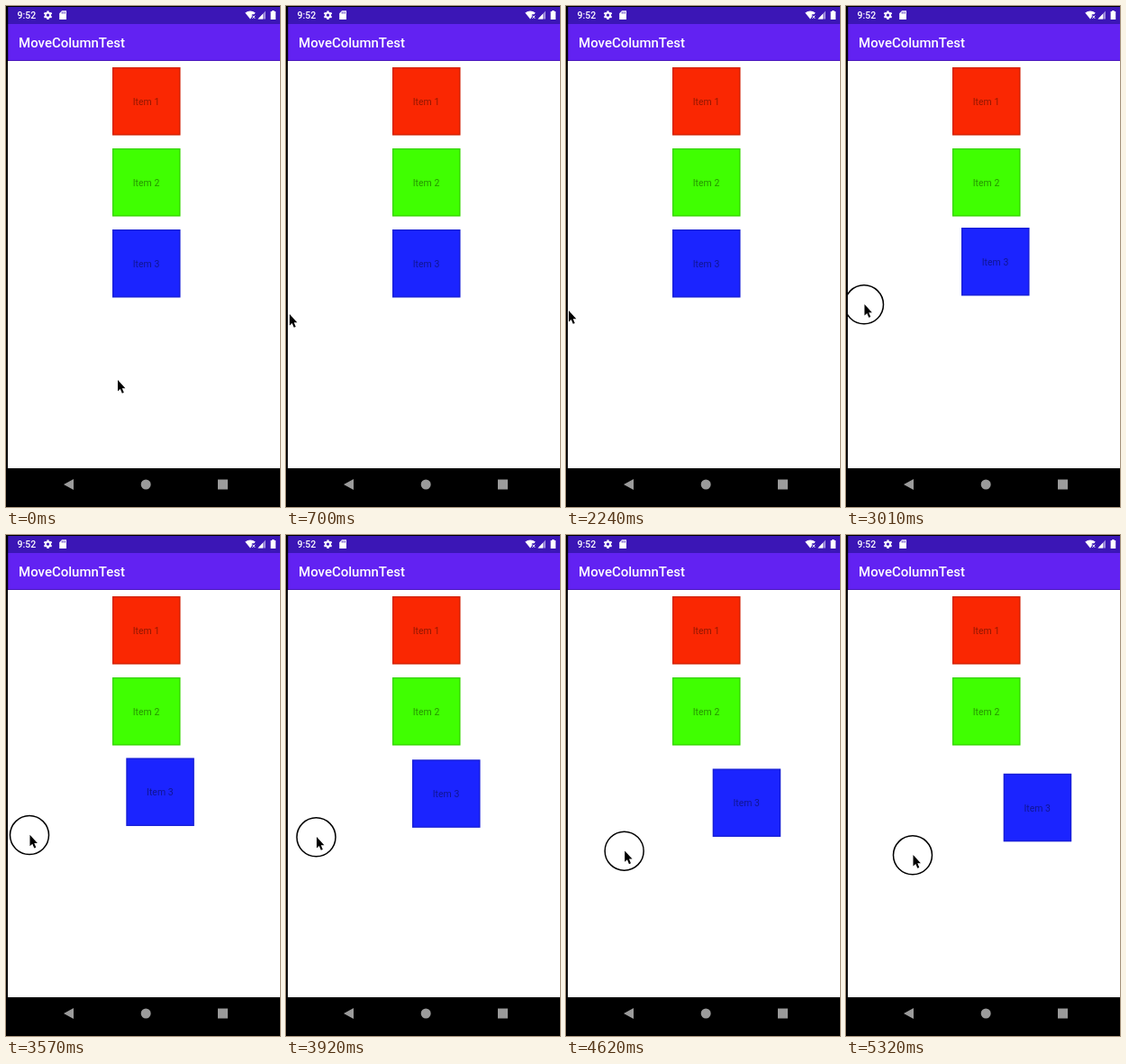
An HTML page with a canvas for the animation above (5390 ms loop, 304 px wide and 556 px high).

```html
<!DOCTYPE html>
<html lang="en">
<head>
<meta charset="utf-8">
<title>Edge drag</title>
<style>
  html, body { margin: 0; width: 100%; height: 100%; overflow: hidden; background: #fff; }
  canvas { display: block; width: 304px; height: 556px; }
</style>
</head>
<body>
<canvas id="stage" width="304" height="556"></canvas>
<script>
const ctx = document.getElementById('stage').getContext('2d');
const LOOP = 5390, STEP = 70, PRESS = 2520;
const FONT = 'Roboto, sans-serif';
const STATUS = '#3b16b6', GRAY = '#9b9b9b', SIZE = 75.5;
const ARROW = new Path2D('M0 0V12.4L2.8 9.9 4.8 14.8 6.8 13.9 4.8 9.2H8.4Z');

// Progress of an ease-out between two times; power 1 is linear
function ease(t, from, to, power = 1) {
  const p = Math.min(1, Math.max(0, (t - from) / (to - from)));
  return 1 - (1 - p) ** power;
}

function travel(x, y, ...legs) {
  for (const [p, dx, dy] of legs) {
    x += p * dx;
    y += p * dy;
  }
  return [x, y];
}

const pointerAt = t => travel(124, 415,
  [ease(t, 0, 700, 2), -120, -73],
  [ease(t, 1470, 1750), -1, -4],
  [ease(t, PRESS, 3010), 17.5, -7],
  [ease(t, 3290, 3920), 13.5, 4],
  [ease(t, 3990, 5040, 1.6), 40.5, 20]);

const draggedAt = t => travel(118, 248,
  [ease(t, 2730, 3010), 10, -2],
  [ease(t, 3290, 3920), 12, 3.3],
  [ease(t, 3990, 5040, 1.16), 34.7, 15.5]);

function rect(x, y, w, h, color) {
  ctx.fillStyle = color;
  ctx.fillRect(x, y, w, h);
}

function path(d, color) {
  ctx.fillStyle = color;
  ctx.fill(new Path2D(d));
}

function circle(x, y, r) {
  ctx.beginPath();
  ctx.arc(x, y, r, 0, Math.PI * 2);
}

function disc(x, y, r, color) {
  circle(x, y, r);
  ctx.fillStyle = color;
  ctx.fill();
}

function label(text, x, y, font, color, align = 'left') {
  ctx.font = font + ' ' + FONT;
  ctx.fillStyle = color;
  ctx.textAlign = align;
  ctx.fillText(text, x, y);
}

function gear(x, y) {
  ctx.save();
  ctx.translate(x, y);
  for (let i = 0; i < 6; i++) {
    rect(-1.1, -4.8, 2.2, 3, '#fff');
    ctx.rotate(Math.PI / 3);
  }
  disc(0, 0, 3.6, '#fff');
  disc(0, 0, 1.6, STATUS);
  ctx.restore();
}

function statusBar() {
  rect(0, 0, 304, 20, STATUS);
  label('9:52', 12.5, 14, '500 10.5px', '#fff');
  gear(46.5, 10.2);
  path('M62 5.3H67V15H59.2V8.2Z', '#fff');
  for (let i = 0; i < 3; i++) rect(61.7 + i * 1.7, 6.5, 0.8, 2, STATUS);

  path('M271 14.5L265.3 7.6Q271 3.4 276.7 7.6Z', '#fff');
  rect(272.8, 9.3, 5, 6, STATUS);
  ctx.strokeStyle = '#fff';
  ctx.lineWidth = 1;
  ctx.stroke(new Path2D('M273.4 10.6L276.2 13.8M276.2 10.6L273.4 13.8'));

  path('M288 5.5V14.5H279.5Z', '#9d8bdb');
  path('M285 8.7V14.5H279.5Z', '#fff');
  rect(295.2, 5, 2.4, 1.5, '#fff');
  rect(293.6, 6, 5.6, 9, '#fff');
}

function toolbar() {
  rect(0, 20, 304, 41, '#6222f2');
  rect(0, 60, 304, 1, '#4a18bd');
  label('MoveColumnTest', 14, 46, '500 15px', '#fff');
}

function navBar() {
  rect(0, 513, 304, 43, '#000');
  path('M64 531L75 525V537Z', GRAY);
  disc(155.2, 531, 5.5, GRAY);
  rect(235, 525.5, 11, 11, GRAY);
}

function frameEdge() {
  rect(0, 0, 2, 556, '#000');
  rect(0, 0, 304, 1, '#000');
  rect(2, 1, 1, 60, 'rgba(0,0,0,.25)');
}

function tile(n, x, y, color) {
  rect(x, y, SIZE, SIZE, color);
  ctx.strokeStyle = 'rgba(0,0,0,.16)';
  ctx.lineWidth = 1.4;
  ctx.strokeRect(x + 0.7, y + 0.7, SIZE - 1.4, SIZE - 1.4);
  label('Item ' + n, x + 37.5, y + 41.8, '10.5px', 'rgba(0,0,0,.42)', 'center');
}

function ring(x, y) {
  circle(x, y, 21.5);
  ctx.strokeStyle = '#000';
  ctx.lineWidth = 1.5;
  ctx.stroke();
}

function arrow(x, y) {
  ctx.save();
  ctx.translate(x, y);
  ctx.strokeStyle = '#fff';
  ctx.lineWidth = 1.6;
  ctx.lineJoin = 'round';
  ctx.stroke(ARROW);
  ctx.fillStyle = '#000';
  ctx.fill(ARROW);
  ctx.restore();
}

function draw(now) {
  const t = Math.floor((now % LOOP) / STEP) * STEP;
  const [px, py] = pointerAt(t);
  rect(0, 0, 304, 556, '#fff');
  statusBar();
  toolbar();
  navBar();
  frameEdge();
  tile(1, 118, 68, '#fa2702');
  tile(2, 118, 158, '#40ff01');
  tile(3, ...draggedAt(t), '#1b24ff');
  if (t >= PRESS) ring(px - 0.5, py + 0.3);
  arrow(px, py);
}

let start;
function tick(now) {
  if (start === undefined) start = now;
  draw(Math.max(0, now - start));
  requestAnimationFrame(tick);
}
draw(0);
requestAnimationFrame(tick);
</script>
</body>
</html>
```
